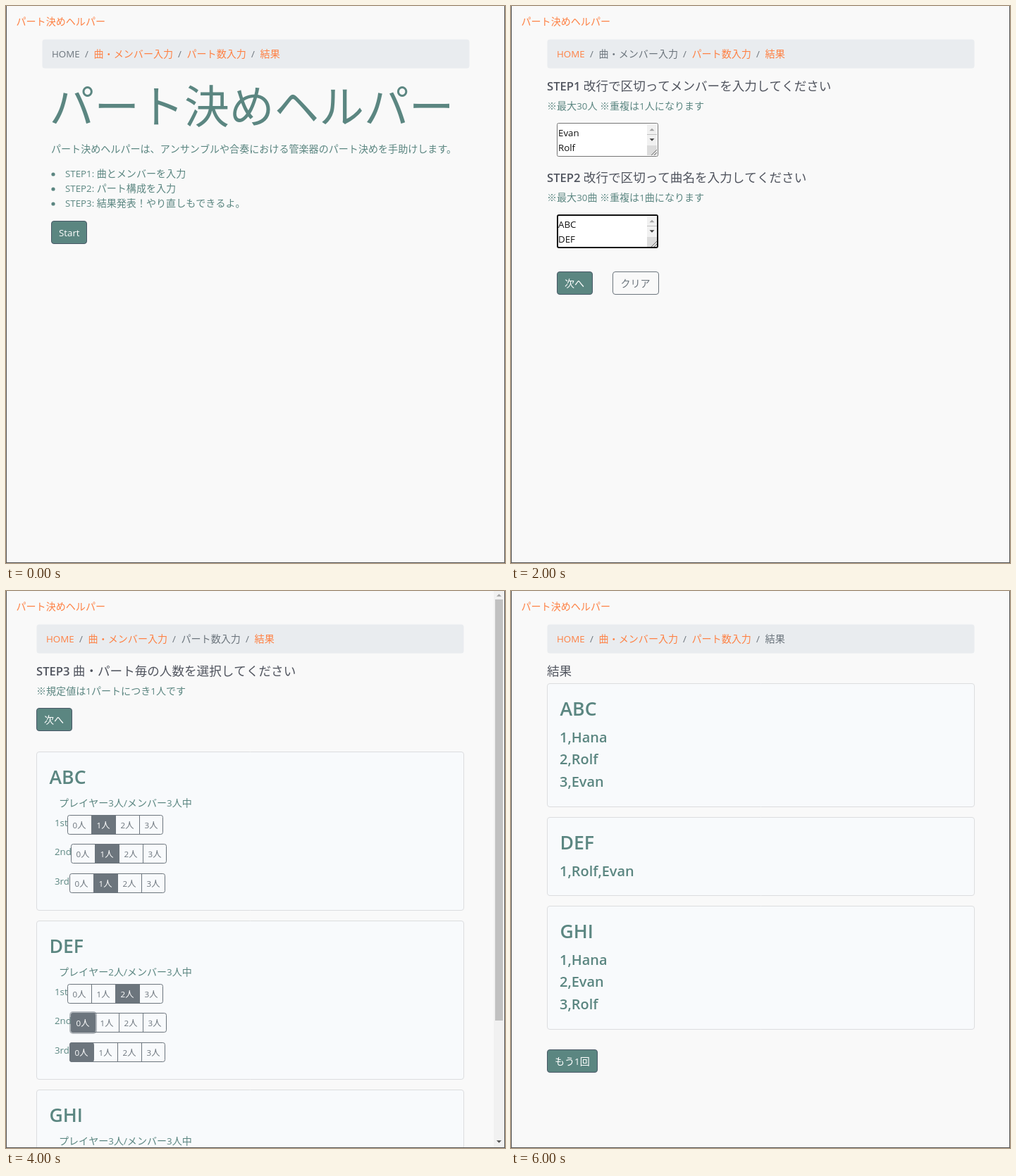
An HTML page with a canvas that plays this animation: 708 px wide and 791 px high, repeating every 8 s.

```html
<!DOCTYPE html>
<html lang="ja">
<head>
<meta charset="utf-8">
<title>パート決めヘルパー</title>
<style>
html, body { margin: 0; width: 100%; height: 100%; overflow: hidden; background: #f9f9f9; }
canvas { display: block; }
</style>
</head>
<body>
<canvas id="stage" width="708" height="791"></canvas>
<script>
const ctx = document.getElementById('stage').getContext('2d');
const W = 708, H = 791, HOLD = 2000;
const TEAL = '#5b8681', ORANGE = '#fe8144', GRAY = '#6c757d', INK = '#50545e';
const LATIN = '"Open Sans", "Noto Sans", sans-serif';
const KANA = '"Noto Sans CJK JP", "Noto Sans CJK", sans-serif';
const CRUMBS = ['HOME', '曲・メンバー入力', 'パート数入力', '結果'];
const CRUMB_X = [14, 73.6, 205.5, 309.6];

// Latin runs are set a little smaller than the kana beside them.
function text(str, x, y, color = TEAL, size = 14, weight = 400) {
  ctx.fillStyle = color;
  for (const run of str.match(/[\x20-\x7e]+|[^\x20-\x7e]+/g)) {
    const latin = run.charCodeAt(0) < 127;
    ctx.font = latin ? `${weight} ${size * 0.95}px ${LATIN}` : `400 ${size * 1.005}px ${KANA}`;
    ctx.fillText(run, x, y);
    x += ctx.measureText(run).width;
  }
}

function rect(x, y, w, h, color) {
  ctx.fillStyle = color;
  ctx.fillRect(x, y, w, h);
}

function box(x, y, w, h, fill, border, r = 3.5, line = 1) {
  const i = line / 2;
  ctx.beginPath();
  ctx.roundRect(x + i, y + i, w - line, h - line, r);
  if (fill) { ctx.fillStyle = fill; ctx.fill(); }
  if (border) { ctx.strokeStyle = border; ctx.lineWidth = line; ctx.stroke(); }
}

function button(label, x, y, w) {
  box(x, y, w, 33, TEAL, '#495867');
  text(label, x + 11, y + 22, '#fff');
}

function card(x, y, h, title) {
  box(x, y, 607, h, '#f8fafc', '#dcdddf');
  text(title, x + 18.5, y + 46, TEAL, 28, 600);
}

function arrow(x, y, dir, color) {
  ctx.fillStyle = color;
  ctx.beginPath();
  ctx.moveTo(x - 3.5, y - 1.75 * dir);
  ctx.lineTo(x + 3.5, y - 1.75 * dir);
  ctx.lineTo(x, y + 1.75 * dir);
  ctx.fill();
}

function base(active, x = 51) {
  rect(0, 0, W, H, '#f9f9f9');
  text('パート決めヘルパー', 14.5, 27, ORANGE);
  box(x, 47, 607, 42, '#e9ecef');
  CRUMBS.forEach((label, i) => {
    const cx = x + CRUMB_X[i];
    if (i) text('/', cx - 12.5, 73, GRAY);
    text(label, cx, 73, i === active ? GRAY : ORANGE);
  });
}

function frame() {
  rect(0, 0, 1, H, '#555');
  rect(W - 1, 0, 1, H, '#555');
  rect(0, H - 1, W, 1, '#555');
}

function textarea(y, lines, focused) {
  box(65, y, 144, 48, '#fff', focused ? '#101010' : '#767676', 2, focused ? 2 : 1);
  rect(193, y + 2, 14, 30, '#f1f1f1');
  rect(193, y + 16, 14, 1, '#c1c1c1');
  rect(193, y + 32, 14, 14, '#dcdcdc');
  arrow(200, y + 9.5, -1, '#a3a3a3');
  arrow(200, y + 24, 1, '#404040');
  ctx.strokeStyle = '#707070';
  ctx.lineWidth = 1;
  ctx.beginPath();
  for (const d of [8, 4]) {
    ctx.moveTo(207 - d, y + 46);
    ctx.lineTo(207, y + 46 - d);
  }
  ctx.stroke();
  lines.forEach((s, i) => text(s, 67, y + 19 + 21 * i, '#111'));
}

function home() {
  base(0);
  text('パート決めヘルパー', 61.5, 166, TEAL, 63.5);
  text('パート決めヘルパーは、アンサンブルや合奏における管楽器のパート決めを手助けします。', 64, 208);
  ['STEP1: 曲とメンバーを入力', 'STEP2: パート構成を入力', 'STEP3: 結果発表！やり直しもできるよ。'].forEach((s, i) => {
    const y = 243 + 21 * i;
    text(s, 84, y);
    ctx.beginPath();
    ctx.arc(67, y - 4, 2.6, 0, Math.PI * 2);
    ctx.fill();
  });
  button('Start', 64, 305, 51);
}

function entry() {
  base(1);
  text('STEP1 改行で区切ってメンバーを入力してください', 51, 120, INK, 17.5, 600);
  text('※最大30人 ※重複は1人になります', 51, 147);
  textarea(166, ['Evan', 'Rolf']);
  text('STEP2 改行で区切って曲名を入力してください', 51, 250, INK, 17.5, 600);
  text('※最大30曲 ※重複は1曲になります', 51, 277);
  textarea(296, ['ABC', 'DEF'], true);
  button('次へ', 65, 377, 51);
  box(144, 377, 66, 33, null, GRAY);
  text('クリア', 155.5, 399, GRAY);
}

function choices(x, y, chosen, focused) {
  box(x, y, 136, 28, null, GRAY, 2.8);
  for (let i = 0; i < 4; i++) {
    const bx = x + 34 * i, on = i === chosen;
    if (on && focused) box(bx - 2.5, y - 2.5, 40, 33, 'rgba(108,117,125,.5)', null, 5);
    if (on) box(bx, y, 35, 28, GRAY, GRAY, i ? 0 : 2.8);
    else if (i && i !== chosen + 1) rect(bx, y, 1, 28, GRAY);
    text(i + '人', bx + 7.5, y + 18.5, on ? '#fff' : GRAY, 12.25);
  }
}

function partCard(y, title, players, picks, focus) {
  card(43, y, 226, title);
  text(`プレイヤー${players}人/メンバー3人中`, 75, y + 78);
  picks.forEach((pick, i) => {
    const top = y + Math.round(90 + 41.4 * i);
    text(['1st', '2nd', '3rd'][i], 69, top + 16);
    choices([87, 92, 90][i], top, pick, i === focus);
  });
}

function parts() {
  base(2, 43);
  text('STEP3 曲・パート毎の人数を選択してください', 43, 120, INK, 17.5, 600);
  text('※規定値は1パートにつき1人です', 43, 147);
  button('次へ', 43, 166, 51);
  partCard(228, 'ABC', 3, [1, 1, 1]);
  partCard(468, 'DEF', 2, [2, 0, 0], 1);
  partCard(708, 'GHI', 3, [1, 1, 1]);
  rect(692, 0, 15, H, '#f1f1f1');
  rect(694, 12, 11, 598, '#c1c1c1');
  arrow(699.5, 6, -1, '#a3a3a3');
  arrow(699.5, 782, 1, '#505050');
}

function resultCard(y, h, title, rows) {
  card(51, y, h, title);
  rows.forEach((s, i) => text(`${i + 1},${s}`, 69, y + 83.5 + 31.5 * i, TEAL, 21, 600));
}

function result() {
  base(3);
  text('結果', 51, 120, INK, 17.5);
  resultCard(131, 176, 'ABC', ['Hana', 'Rolf', 'Evan']);
  resultCard(321, 112, 'DEF', ['Rolf,Evan']);
  resultCard(447, 176, 'GHI', ['Hana', 'Evan', 'Rolf']);
  button('もう1回', 51, 651, 72);
}

const scenes = [home, entry, parts, result];
const start = performance.now();

function tick() {
  const t = Math.max(0, performance.now() - start);
  scenes[Math.floor(t / HOLD) % scenes.length]();
  frame();
  requestAnimationFrame(tick);
}
tick();
</script>
</body>
</html>
```
